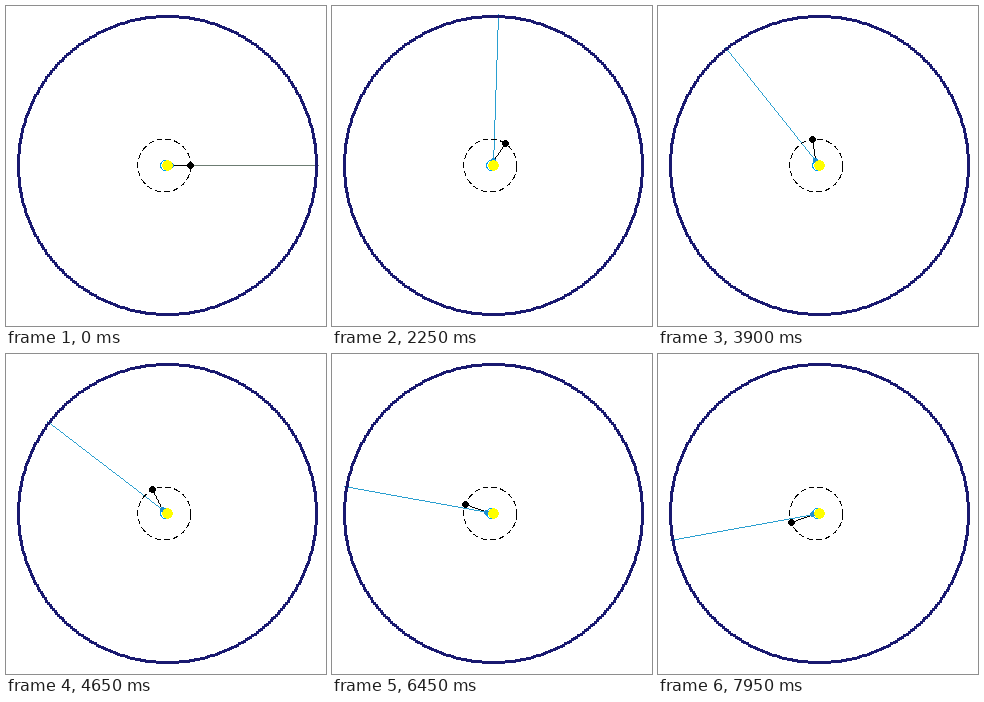
Write a matplotlib script that moves like this. It is 320 px wide and 320 px high and loops after 8 s.

```python
import numpy as np
import matplotlib.pyplot as plt
from matplotlib.animation import FuncAnimation
from matplotlib.colors import to_rgb

SIZE, DPI = 320, 100
INTERVAL, FRAMES, HOLD = 50, 160, 3
STEPS_PER_TURN = 96

SUN = np.array([161.0, 159.0])
ORBIT = 5.3                        # radius of the planet's circle
ECC = 0.30
CENTER = SUN - [ECC * ORBIT, 0]
EQUANT = SUN - [2 * ECC * ORBIT, 0]
CLOCK_RADIUS = 26.5
DASH, DASH_PERIOD = 6, 9
SKY_RADIUS, SIGHT_LENGTH = 149, 151

NAVY, SKY_BLUE, PLANET_BLUE = "#191970", "#00a2f0", "#1e90d2"
SIGHT_BLUE, APSIS_GRAY = "#2a9fd0", "#6c7c72"

ROWS, COLS = np.mgrid[:SIZE, :SIZE]


def polar(angle):
    """Unit vector in screen space, counter-clockwise from the right."""
    return np.array([np.cos(angle), -np.sin(angle)])


def distance(xy):
    return np.hypot(COLS - xy[0], ROWS - xy[1])


def ring(xy, radius):
    return np.abs(distance(xy) - radius) < 0.5


def disc(xy, radius):
    return distance(np.round(xy)) <= radius


def line(start, end):
    """Mask of a one-pixel line without smoothing."""
    start, end = np.round(start), np.round(end)
    count = int(np.abs(end - start).max()) + 1
    x, y = np.round(np.linspace(start, end, count)).astype(int).T
    mask = np.zeros((SIZE, SIZE), bool)
    mask[y, x] = True
    return mask


def dashed_ring(xy, radius):
    angle = np.arctan2(ROWS - xy[1], COLS - xy[0]) % (2 * np.pi)
    return ring(xy, radius) & (angle * radius % DASH_PERIOD < DASH)


def dotted_ring(xy, radius):
    """Ring of 3 x 3 pixel dots, which gives a rough edge."""
    dots = xy[:, None] + radius * polar(np.radians(np.arange(360)))
    x, y = np.round(dots).astype(int)
    mask = np.zeros((SIZE, SIZE), bool)
    for dx in (-1, 0, 1):
        for dy in (-1, 0, 1):
            mask[y + dy, x + dx] = True
    return mask


SKY = dotted_ring(SUN, SKY_RADIUS)
CLOCK = dashed_ring(EQUANT, CLOCK_RADIUS)
ORBIT_RING = ring(CENTER, ORBIT)
SUN_DISC = disc(SUN, 5.3)


def scene(step):
    mean = 2 * np.pi * step / STEPS_PER_TURN
    reach = ECC * np.cos(mean) + np.sqrt(1 - (ECC * np.sin(mean)) ** 2)
    body = EQUANT + ORBIT * reach * polar(mean)
    toward = body - SUN
    tip = SUN + SIGHT_LENGTH * toward / np.hypot(*toward)
    hand = EQUANT + CLOCK_RADIUS * polar(mean)

    layers = [
        (line(SUN, tip), SIGHT_BLUE if step else APSIS_GRAY),
        (SKY, NAVY),
        (CLOCK, "black"),
        (ORBIT_RING, SKY_BLUE),
        (line(EQUANT, hand), "black"),
        (disc(body, 2.3), PLANET_BLUE),
        (SUN_DISC, "#ffff00"),
        (disc(hand, 3.2), "black"),
    ]
    canvas = np.ones((SIZE, SIZE, 3))
    for mask, color in layers:
        canvas[mask] = to_rgb(color)
    return canvas


fig = plt.figure(figsize=(SIZE / DPI, SIZE / DPI), dpi=DPI, facecolor="white")
ax = fig.add_axes([0, 0, 1, 1])
ax.axis("off")
picture = ax.imshow(scene(0), interpolation="nearest", aspect="auto")


def draw(frame):
    picture.set_data(scene(frame // HOLD))
    return [picture]


anim = FuncAnimation(fig, draw, frames=FRAMES, interval=INTERVAL,
                     repeat=True, repeat_delay=0, blit=False)
plt.show()
```
